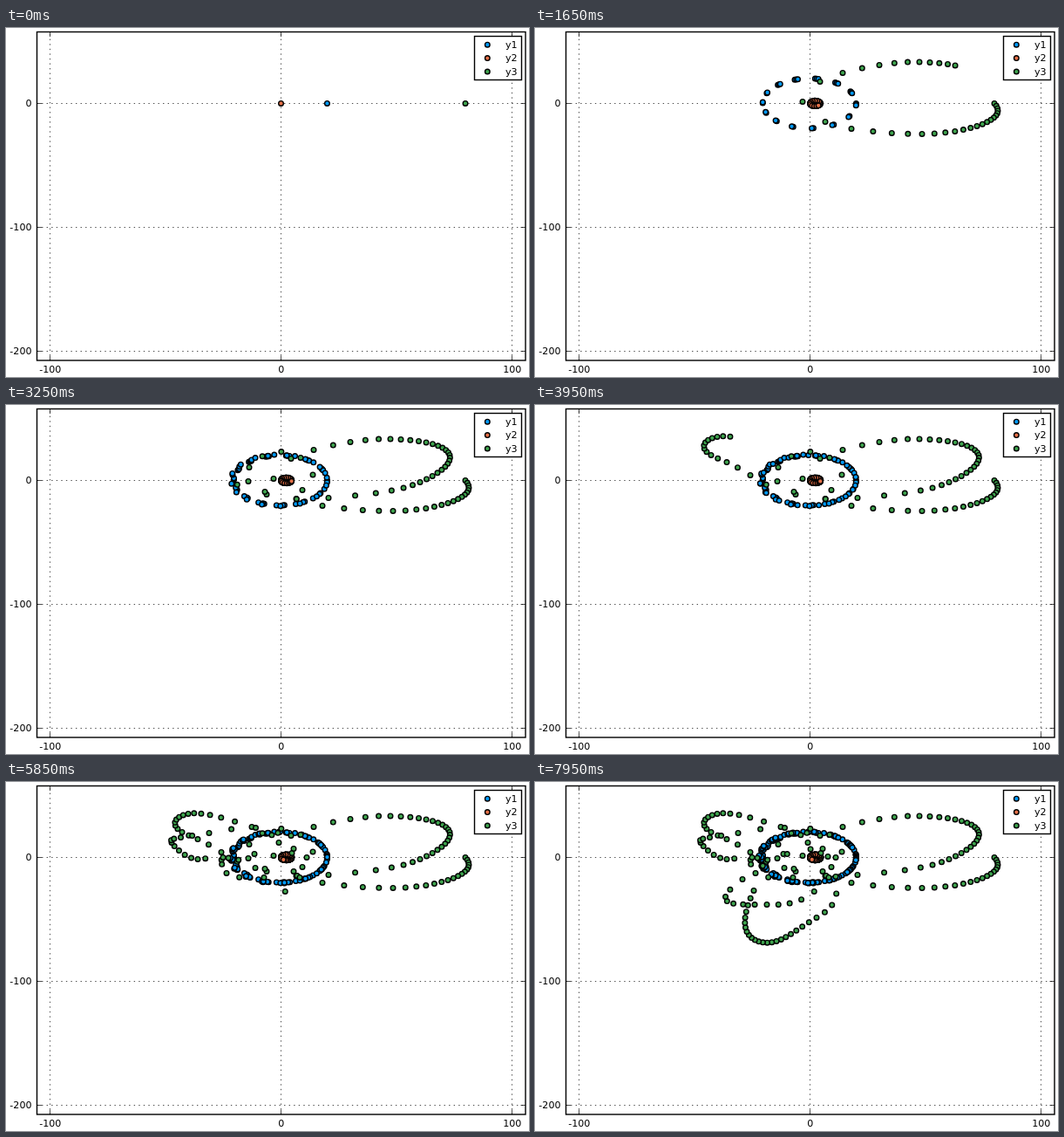
Recreate the animation shown at these times as an HTML page with a canvas. Size 600 px wide and 400 px high, loop 8000 ms.

```html
<!DOCTYPE html>
<html lang="en">
<head>
<meta charset="utf-8">
<title>Three-body scatter plot</title>
<style>
  html, body { margin: 0; width: 100%; height: 100%; overflow: hidden; background: #fff; }
  canvas { display: block; }
</style>
</head>
<body>
<canvas id="plot" width="600" height="400"></canvas>
<script>
const ctx = document.getElementById('plot').getContext('2d');
const STEP_MS = 50, STEPS = 160;
const COLORS = ['#009afa', '#e36f47', '#3ea44e'];
const FRAME = { x: 35.5, y: 4.5, w: 560.5, h: 376.5 };
const toX = x => 315.5 + x * 2.6465;
const toY = y => 86.4 - y * 1.418;

// Outer body: [step, x, y] in pixels, joined by a cubic spline over time.
const KNOTS = [
  [0, 527, 86], [10, 507, 112], [16, 444, 121], [20, 363, 115], [21, 333, 107],
  [22, 307, 84], [23, 327, 61], [24, 353, 51], [26, 395, 42], [30, 453, 39],
  [39, 509, 57], [48, 475, 88], [54, 370, 106], [56, 299, 102], [57, 278, 87],
  [58, 279, 71], [61, 338, 60], [63, 340, 97], [64, 297, 99], [66, 247, 80],
  [70, 202, 57], [77, 209, 36], [83, 282, 51], [85, 328, 81], [86, 334, 107],
  [87, 286, 98], [90, 220, 88], [95, 190, 69], [100, 233, 58], [104, 330, 76],
  [105, 330, 102], [106, 296, 109], [108, 253, 104], [110, 249, 86], [113, 285, 82],
  [114, 313, 69], [115, 345, 86], [116, 337, 109], [121, 266, 140], [128, 238, 111],
  [132, 336, 85], [133, 345, 108], [137, 323, 155], [144, 277, 182], [152, 243, 171],
  [159, 251, 124]
];

function spline(times, values) {
  const last = times.length - 1;
  const gap = i => times[i + 1] - times[i];
  const slope = i => (values[i + 1] - values[i]) / gap(i);
  const bend = new Array(last + 1).fill(0);
  for (let pass = 0; pass < 80; pass++) {
    for (let i = 1; i < last; i++) {
      bend[i] = (6 * (slope(i) - slope(i - 1)) - gap(i - 1) * bend[i - 1] - gap(i) * bend[i + 1])
        / (2 * (gap(i - 1) + gap(i)));
    }
    bend[0] = bend[1];
    bend[last] = bend[last - 1];
  }
  return t => {
    let i = 0;
    while (i < last - 1 && t > times[i + 1]) i++;
    const h = gap(i), b = (t - times[i]) / h, a = 1 - b;
    return a * values[i] + b * values[i + 1]
      + ((a ** 3 - a) * bend[i] + (b ** 3 - b) * bend[i + 1]) * h * h / 6;
  };
}

const column = i => KNOTS.map(knot => knot[i]);
const outerX = spline(column(0), column(1));
const outerY = spline(column(0), column(2));

// Inner pair: a Kepler ellipse that widens and slows as the outer body passes.
function innerPair(step) {
  const u = Math.min(1, Math.max(0, (step - 33) / 32));
  const ramp = u * u * (3 - 2 * u);
  const a = 22.5 + ramp * (0.7 + 0.4 * Math.sin(step / 7));
  const e = 1 - 20 / a;
  const mean = (25.57 * step - 60 * ramp) * Math.PI / 180;
  let E = mean;
  for (let i = 0; i < 12; i++) E = mean + e * Math.sin(E);
  const x = a * (Math.cos(E) - e);
  const y = a * Math.sqrt(1 - e * e) * Math.sin(E);
  const at = share => [toX(2 + share * x), toY(share * y)];
  return [at(0.9), at(-0.1)];
}

const trails = [[], [], []];
for (let step = 0; step < STEPS; step++) {
  const [light, heavy] = innerPair(step);
  trails[0].push(light);
  trails[1].push(heavy);
  trails[2].push([outerX(step), outerY(step) + 0.4]);
}

function line(x1, y1, x2, y2) {
  ctx.beginPath();
  ctx.moveTo(x1, y1);
  ctx.lineTo(x2, y2);
  ctx.stroke();
}

function marker([x, y], color) {
  ctx.beginPath();
  ctx.arc(x, y, 2.8, 0, 2 * Math.PI);
  ctx.fillStyle = color;
  ctx.fill();
  ctx.lineWidth = 1.4;
  ctx.stroke();
}

function label(text, x, y, align) {
  ctx.fillStyle = '#000';
  ctx.textAlign = align;
  ctx.fillText(text, x, y);
}

function box(x, y, w, h) {
  ctx.lineWidth = 1.4;
  ctx.strokeRect(x, y, w, h);
}

function drawAxes() {
  const { x, y, w, h } = FRAME, right = x + w, bottom = y + h, tick = 5.5;
  ctx.lineWidth = 0.7;
  for (const value of [-100, 0, 100]) {
    const px = Math.floor(toX(value)) + 0.5;
    ctx.setLineDash([1.39, 4.17]);
    line(px, bottom, px, y);
    ctx.setLineDash([]);
    line(px, bottom, px, bottom - tick);
    line(px, y, px, y + tick);
    label(value, px + 0.3, 395, 'center');
  }
  for (const value of [0, -100, -200]) {
    const py = Math.floor(toY(value)) + 0.5;
    ctx.setLineDash([1.39, 4.17]);
    line(x, py, right, py);
    ctx.setLineDash([]);
    line(x, py, x + tick, py);
    line(right, py, right - tick, py);
    label(value, 29.5, py + 3.5, 'right');
  }
}

function drawLegend() {
  ctx.fillStyle = '#fff';
  ctx.fillRect(537.5, 9.5, 54, 50);
  box(537.5, 9.5, 54, 50);
  COLORS.forEach((color, i) => {
    const y = 19.2 + i * 15.4;
    marker([552.3, y], color);
    label('y' + (i + 1), 573, y + 3.6, 'left');
  });
}

function draw(step) {
  ctx.fillStyle = '#fff';
  ctx.fillRect(0, 0, 600, 400);
  ctx.strokeStyle = '#000';
  ctx.font = '11.1px "DejaVu Sans", sans-serif';
  drawAxes();
  trails.forEach((trail, i) => {
    for (const point of trail.slice(0, step + 1)) marker(point, COLORS[i]);
  });
  box(FRAME.x, FRAME.y, FRAME.w, FRAME.h);
  drawLegend();
}

let shown = -1;
function tick() {
  const step = Math.floor(performance.now() / STEP_MS) % STEPS;
  if (step !== shown) draw(shown = step);
  requestAnimationFrame(tick);
}
tick();
</script>
</body>
</html>
```
